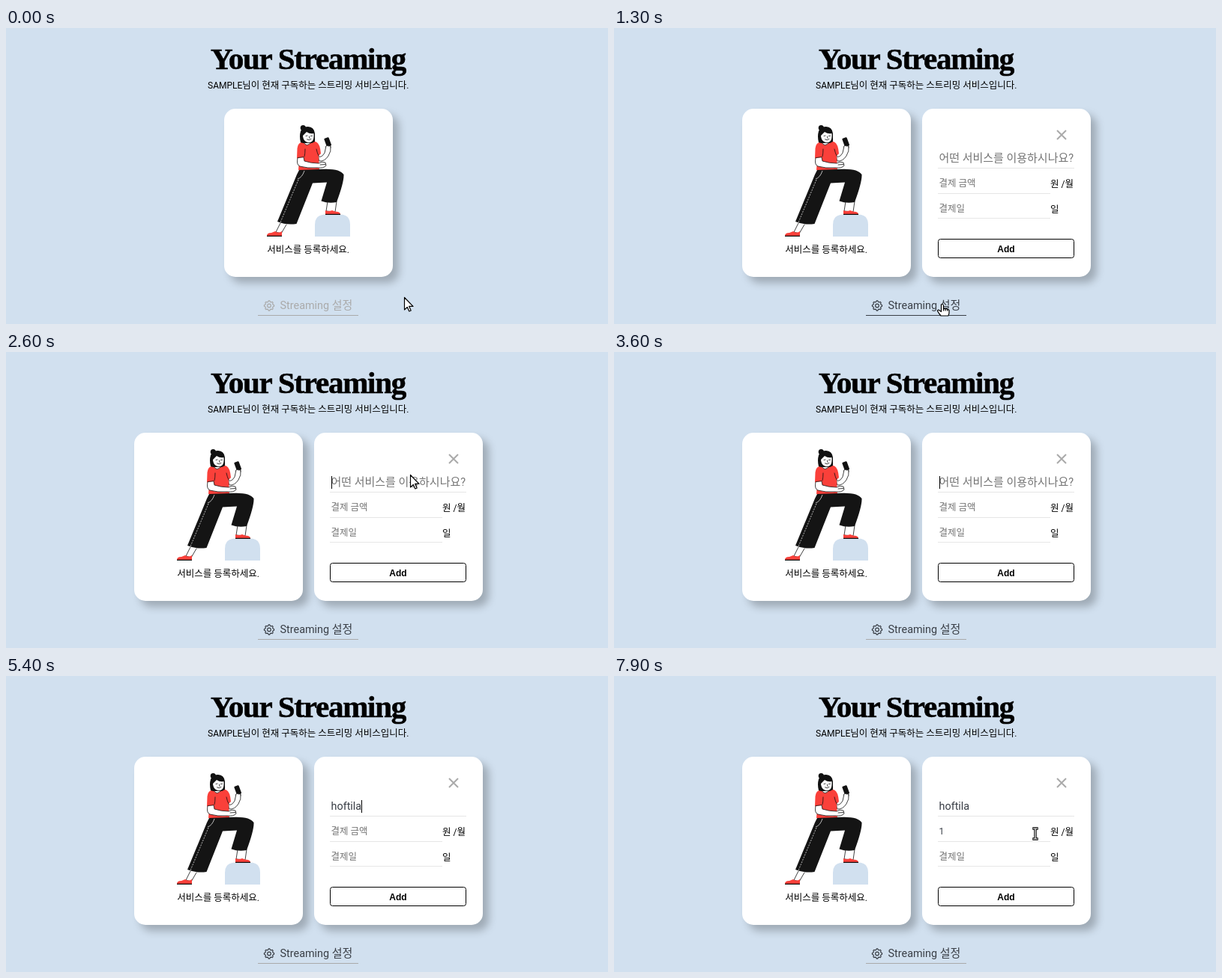
An HTML page for the animation above (8000 ms loop, 803x396 px).

```html
<!DOCTYPE html>
<html lang="ko">
<head>
<meta charset="utf-8">
<style>
  html, body { margin: 0; width: 100%; height: 100%; overflow: hidden; background: #d1e0ef; }
  svg { display: block; font: 12px Roboto, "Noto Sans CJK KR", "Noto Sans CJK", sans-serif; }
  .ko { font-size: 1.043em; font-weight: 300; }
  .mid { text-anchor: middle; }
  .big { font-size: 14.4px; }
  .hint { fill: #757575; }
  .typed { fill: #393e46; }
  .title { font: bold 41px "Liberation Serif", serif; letter-spacing: -1.25px; stroke: #000; stroke-width: .6; }
  .card { fill: #fff; filter: drop-shadow(8px 8px 5.5px rgba(0, 0, 0, .24)); }
  .rule { stroke: #e6e6e6; }
  .ink { fill: none; stroke: #111; stroke-width: .8; stroke-linecap: round; stroke-linejoin: round; }
  .skin { fill: #fff; }
  .red { fill: #fa403a; }
</style>
</head>
<body>
<svg width="803" height="396" viewBox="0 0 803 396">
  <text class="title mid" x="403" y="55">Your Streaming</text>
  <text class="mid" x="403.300" y="81">SAMPLE님이 현재 구독하는 스트리밍 서비스입니다.</text>

  <g id="cardA">
    <rect class="card" x="291" y="108" width="225" height="225" rx="15"/>
    <path fill="#d1e0ef" d="M412 279V263Q412 249.500 426 249.500H446Q459 249.500 459 263V279Z"/>
    <!-- feet -->
    <path class="ink skin" d="M366 261L360 273 367 275 374 263M429 232L427 245 439 246 441 232"/>
    <path class="red" d="M348 278Q348 274 354 274L359 272Q363 275 368 272V278ZM426 249V244Q430 246 435 244Q439 246 443 246Q446 247 446 249Z"/>
    <path stroke="#111" stroke-width="1.300" d="M348 278.300H368M426 249.300H446"/>
    <!-- forearm with phone -->
    <path class="ink skin" d="M417 172Q421 174 425 167L427 158Q430 155 433 158Q434 165 430 171Q425 179 418 178Z"/>
    <rect x="-3.300" y="-6" width="6.600" height="12" rx="1.200" fill="#111" transform="translate(429.200 152.700)rotate(-20)"/>
    <path class="ink skin" d="M426 159Q428 156 430.500 158Q433 157 433 160"/>
    <!-- shirt -->
    <path class="red" d="M397 152Q389 153 388.500 161L388 174 391 177 390 190 418 190 417 171 420 168Q419 155 414 152.500Q409 151 405 152Z"/>
    <path class="ink skin" d="M397.500 149L397 153Q401 160 407 153L406 149Z"/>
    <path class="ink" d="M399 162Q399 168 398 172M414 162Q415 167 417 171"/>
    <path class="ink skin" d="M389 174Q387 183 392 185Q402 188 415 187Q424 188 427 184L426 180Q421 178 417 181Q407 181 398 178L397 173Z"/>
    <path class="ink" d="M419 183L426 182.500"/>
    <!-- head -->
    <circle cx="396.300" cy="133.700" r="3.600" fill="#111"/>
    <path fill="#111" d="M393 153Q391 145 393 138Q396 131.500 403 132Q411 132.500 412 141V152L408 154 396 154Z"/>
    <path class="skin" d="M396 144Q399 141 401 139Q405 142 410.500 141Q411 148 409 151Q405 155 400 152Q396 149 396 144Z"/>
    <path class="ink" d="M400 144.500L402 144M406.500 144.500L408.500 144.200M404.500 145L405 147.500M401.500 149Q404 151 407 148.700"/>
    <!-- trousers -->
    <path fill="#141414" d="M391 190L418 189Q445 187 450.500 196Q451 206 441 233Q430 235 420.500 231.500L428 206.500 409 207.500 387.500 262Q374 264 362 259L388 196Z"/>
    <path fill="none" stroke="#fff" stroke-width=".7" stroke-dasharray="2 1.500" d="M390 203L366 260"/>
    <path fill="none" stroke="#fff" stroke-width=".7" d="M398 191Q395 200 389 202"/>
    <text class="mid" x="403" y="301">서비스를 등록하세요.</text>
  </g>

  <g id="cardB">
    <rect class="card" x="411" y="108" width="225" height="225" rx="15"/>
    <path stroke="#aaa" stroke-width="2" d="M591 137L603 149M603 137L591 149"/>
    <path class="rule" d="M432 187.500H614M432 221.500H582M432 254.500H582"/>
    <text class="big hint" id="hint1" x="433.500" y="179">어떤 서비스를 이용하시나요?</text>
    <text class="big typed" id="name" x="433.500" y="179"></text>
    <text class="hint" id="hint2" x="433.500" y="212">결제 금액</text>
    <text class="typed" id="price" x="433.500" y="212"></text>
    <text class="hint" x="433.500" y="246">결제일</text>
    <text x="582" y="213">원 /월</text>
    <text x="582" y="247">일</text>
    <rect x="432.500" y="282.500" width="181" height="25" rx="3" fill="none" stroke="#000"/>
    <text class="mid" x="523" y="300" style="font:bold 12px 'Liberation Sans',sans-serif">Add</text>
    <rect id="caret" width="1"/>
  </g>

  <g id="link">
    <path id="gear" fill="none" stroke="currentColor" stroke-width="1.200" stroke-linejoin="round"/>
    <circle cx="351" cy="371.500" r="2.300" fill="none" stroke="currentColor" stroke-width="1.200"/>
    <text class="big" x="365.500" y="376" fill="currentColor">Streaming 설정</text>
  </g>
  <path id="line" d="M336 384.500H470"/>

  <g id="cursor" fill="#fff" stroke="#000" stroke-width="1.200" stroke-linejoin="round">
    <path id="arrow" d="M.5.5V17L4.300 13.400 6.800 19 9.200 18 6.700 12.400H12Z"/>
    <path id="hand" d="M-1.500 1.500Q-1.500-.5 0-.5T1.500 1.500V6Q2.800 5 4 6Q5.500 5.200 6.600 6.400Q8.500 6 9 8V11Q9 13 7.800 15H-2Q-5 11.500-6.500 8.500Q-6 6.500-4.300 7.500L-1.500 9.500ZM1.500 6V8.500M4 6V8.500M6.600 6.400V8.500"/>
    <g id="beam">
      <path stroke-width="3.400" stroke-linecap="square" d="M-2-7H2M-2 7H2M0-7V7"/>
      <path stroke="#fff" d="M-3-7H3M-3 7H3M0-7V7"/>
    </g>
  </g>
</svg>
<script>
const $ = id => document.getElementById(id);
const show = (el, on) => el.style.display = on ? '' : 'none';
const LOOP = 8000, STEP = 100, NAME = 'hoftila';
const keyTimes = [3900, 4300, 4600, 4800, 5000, 5200, 5400];
// time, x, y of the pointer
const path = [
  [0, 531, 360], [400, 531, 360], [900, 438, 370], [1700, 438, 370],
  [2100, 504, 161], [2300, 504, 161], [2500, 546, 164], [2600, 539, 164],
  [6000, 597, 168], [6500, 554, 211], [6700, 554, 211], [6800, 562, 211], [LOOP, 562, 211]
];

// Hangul runs are set slightly larger than Latin
for (const el of document.querySelectorAll('text'))
  el.innerHTML = el.textContent.replace(/[가-힣]+/g, '<tspan class="ko">$&</tspan>');

const teeth = [];
for (let i = 0; i < 32; i++) {
  const a = (i - 1.5) * Math.PI / 16, r = i % 4 === 1 || i % 4 === 2 ? 6.6 : 5.3;
  teeth.push((351 + r * Math.sin(a)).toFixed(2) + ' ' + (371.5 - r * Math.cos(a)).toFixed(2));
}
$('gear').setAttribute('d', 'M' + teeth.join('L') + 'Z');

function grey(mix) {
  const ch = to => Math.round(170 + (to - 170) * mix);
  return `rgb(${ch(57)},${ch(62)},${ch(70)})`;
}
const ramp = (t, a, b) => Math.min(1, Math.max(0, (t - a) / (b - a)));

function movePointer(t) {
  const visible = t < 2700 || t >= 6000;
  show($('cursor'), visible);
  if (!visible) return;
  const i = path.findIndex(p => p[0] > t), [t0, x0, y0] = path[i - 1], [t1, x1, y1] = path[i];
  const k = (t - t0) / (t1 - t0);
  $('cursor').setAttribute('transform', `translate(${x0 + (x1 - x0) * k} ${y0 + (y1 - y0) * k})`);
  const kind = t >= 700 && t < 1800 ? 'hand' : t >= 6400 ? 'beam' : 'arrow';
  for (const id of ['arrow', 'hand', 'beam']) show($(id), id === kind);
}

function placeCaret(t) {
  const second = t >= 6500;
  const on = [[2500, 3000], [3600, 6000], [6500, 7100], [7300, 7900]].some(([a, b]) => t >= a && t < b);
  const caret = $('caret');
  show(caret, on);
  const text = $(second ? 'price' : 'name');
  const width = text.textContent ? text.getComputedTextLength() : 0;
  caret.setAttribute('x', Math.round(433.6 + width));
  caret.setAttribute('y', second ? 201 : 166);
  caret.setAttribute('height', second ? 14 : 17);
}

function draw(t) {
  const open = t >= 1300;
  $('cardA').setAttribute('transform', `translate(${open ? -120 : 0} 0)`);
  show($('cardB'), open);
  const hover = ramp(t, 600, 900);
  $('link').style.color = grey(hover);
  $('line').style.stroke = grey(hover - ramp(t, 1800, 2100));
  const name = NAME.slice(0, keyTimes.filter(k => k <= t).length);
  const price = t >= 7300 ? '1' : '';
  $('name').textContent = name;
  $('price').textContent = price;
  show($('hint1'), !name);
  show($('name'), name);
  show($('hint2'), !price);
  show($('price'), price);
  placeCaret(t);
  movePointer(t);
}

const start = performance.now();
function frame() {
  const t = (performance.now() - start) % LOOP;
  draw(Math.floor(t / STEP) * STEP);
  requestAnimationFrame(frame);
}
frame();
</script>
</body>
</html>
```
